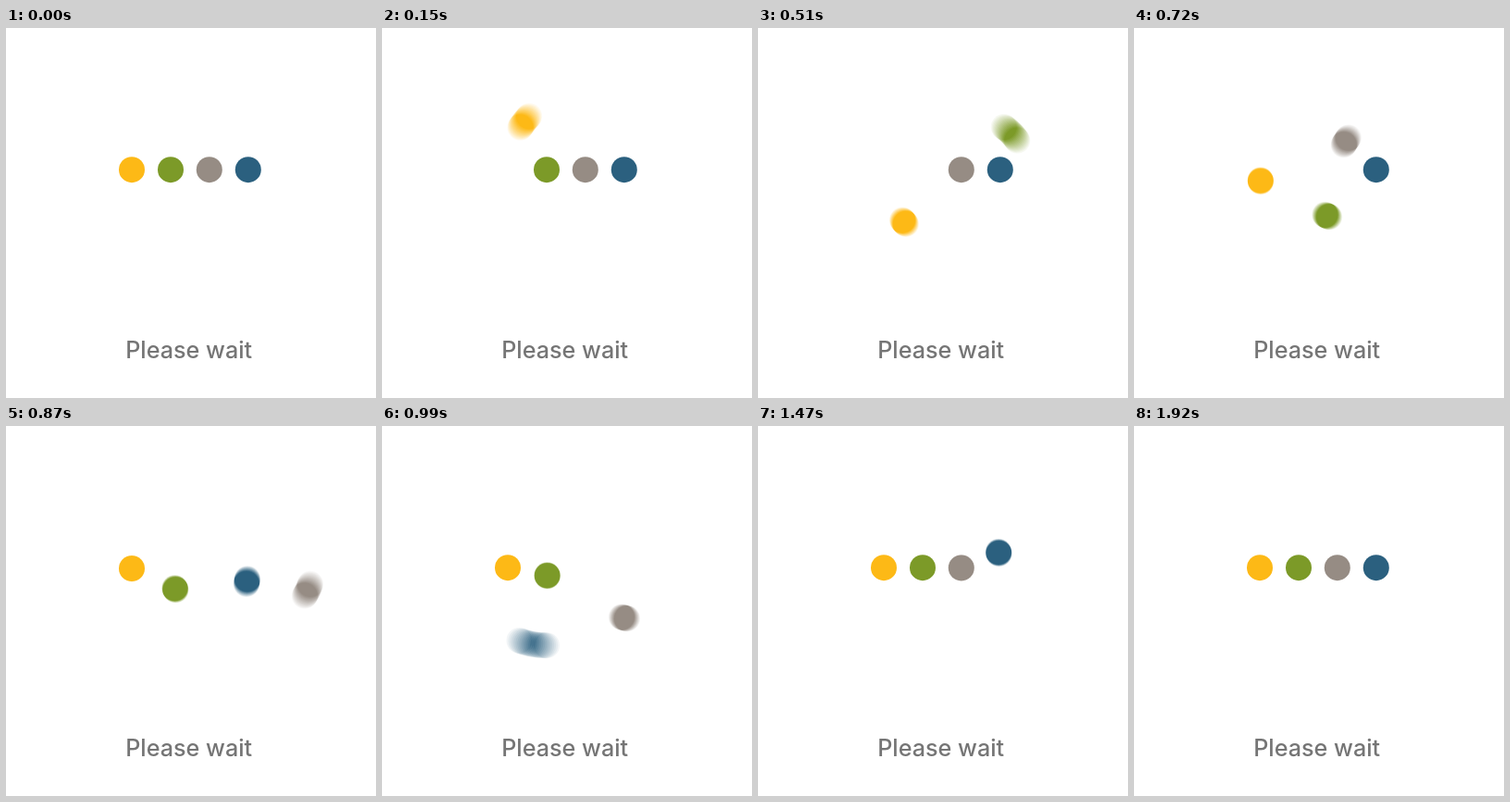
An HTML page with a canvas that plays this animation: 400 by 400 pixels, repeating every 1.98 s.

```html
<!DOCTYPE html>
<html lang="en">
<head>
<meta charset="utf-8">
<title>Please wait</title>
<style>
  html, body { margin: 0; width: 100%; height: 100%; overflow: hidden; background: #fff; }
  canvas, svg { position: absolute; left: 0; top: 0; width: 400px; height: 400px; }
  text { font: 500 25.2px Inter, "Open Sans", sans-serif; fill: #757575; text-anchor: middle; }
</style>
</head>
<body>
<canvas id="stage" width="400" height="400"></canvas>
<svg viewBox="0 0 400 400"><text x="197.7" y="356.5">Please wait</text></svg>
<script>
const LOOP = 1980, STEP = 30, TURN = 930;
const SHUTTER = 16, SAMPLES = 16;
const RADIUS = 14, ROW = 153.2;

// Each dot makes one clockwise turn around the point at x = pivot.
const dots = [
  { x: 136, pivot: 220, delay: 0, color: '#fdb916' },
  { x: 178, pivot: 234, delay: 276, color: '#7c9a28' },
  { x: 219.8, pivot: 275.8, delay: 577, color: '#968c84' },
  { x: 261.8, pivot: 177.8, delay: 781, color: '#2b607f' }
];

const ctx = document.getElementById('stage').getContext('2d');
const layer = document.createElement('canvas');
layer.width = layer.height = 400;
const ink = layer.getContext('2d');

// cubic-bezier(x1, 0, x2, 1), solved by bisection
function ease(p, x1 = 0.384, x2 = 0.053) {
  if (p <= 0) return 0;
  if (p >= 1) return 1;
  let lo = 0, hi = 1;
  for (let i = 0; i < 24; i++) {
    const s = (lo + hi) / 2, r = 1 - s;
    const x = 3 * s * r * r * x1 + 3 * s * s * r * x2 + s * s * s;
    if (x < p) lo = s; else hi = s;
  }
  return lo * lo * (3 - 2 * lo);
}

function place(dot, t) {
  const angle = 2 * Math.PI * ease((t - dot.delay) / TURN);
  const arm = dot.x - dot.pivot;
  return [dot.pivot + arm * Math.cos(angle), ROW + arm * Math.sin(angle)];
}

function disc(c, [x, y]) {
  c.beginPath();
  c.arc(x, y, RADIUS, 0, 2 * Math.PI);
  c.fill();
}

function drawBlurred(dot, t) {
  ink.globalCompositeOperation = 'source-over';
  ink.clearRect(0, 0, 400, 400);
  ink.globalCompositeOperation = 'lighter';
  ink.fillStyle = '#000';
  ink.globalAlpha = 1 / SAMPLES;
  for (let i = 0; i < SAMPLES; i++) {
    disc(ink, place(dot, t + SHUTTER * ((i + 0.5) / SAMPLES - 0.5)));
  }
  // Tint the accumulated coverage
  ink.globalAlpha = 1;
  ink.globalCompositeOperation = 'source-in';
  ink.fillStyle = dot.color;
  ink.fillRect(0, 0, 400, 400);
  ctx.drawImage(layer, 0, 0);
}

function draw(t) {
  ctx.clearRect(0, 0, 400, 400);
  for (const dot of dots) {
    const age = t - dot.delay;
    if (age > 0 && age < TURN) {
      drawBlurred(dot, t);
    } else {
      ctx.fillStyle = dot.color;
      disc(ctx, [dot.x, ROW]);
    }
  }
}

const start = performance.now();
let shown = -1;
function tick() {
  const t = (performance.now() - start) % LOOP;
  const step = Math.floor(t / STEP);
  if (step !== shown) {
    shown = step;
    draw(step * STEP);
  }
  requestAnimationFrame(tick);
}
tick();
</script>
</body>
</html>
```
